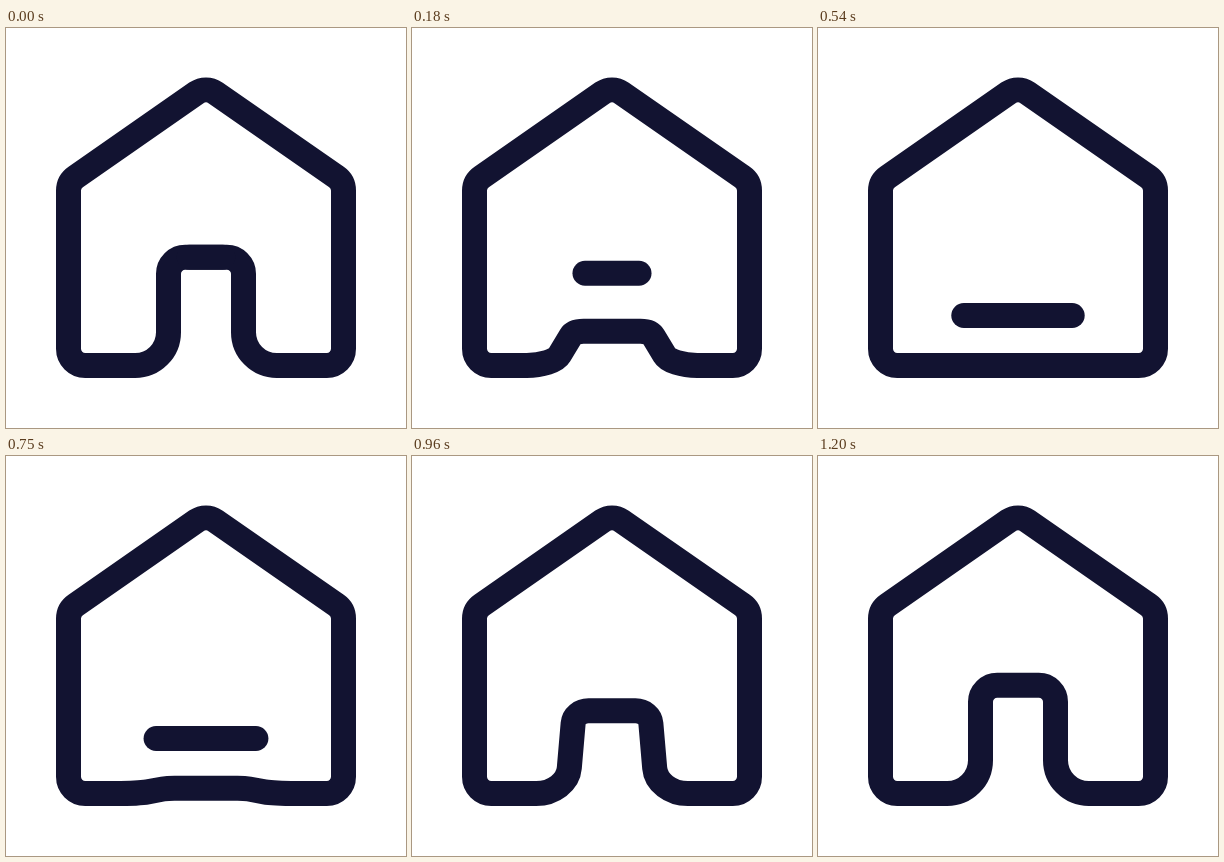
These frames come from a looping animation (400 px wide and 400 px high, 3230 ms). An HTML page:

```html
<!DOCTYPE html>
<html lang="en">
<head>
<meta charset="utf-8">
<title>Home</title>
<style>
  html, body { margin: 0; width: 100%; height: 100%; overflow: hidden; background: #fff; }
  svg { display: block; width: 100%; height: 100%; }
  path { fill: none; stroke: #121331; stroke-width: 25; stroke-linecap: round; stroke-linejoin: round; }
</style>
</head>
<body>
<svg viewBox="0 0 400 400">
  <path id="house"/>
  <path id="bar"/>
</svg>
<script>
const LOOP = 3230, STEP = 30, OPEN_AT = 660, DURATION = 540, CLOSE_DURATION = 360;
const FLOOR = 337.5, DOOR_TOP = 229.2;

const house = document.getElementById('house');
const bar = document.getElementById('bar');

const mix = (a, b, k) => a + (b - a) * k;
const clamp = v => Math.min(1, Math.max(0, v));

// Cubic easing with control points (x1, 0) and (x2, 1).
const ease = (x1, x2) => x => {
  x = clamp(x);
  let low = 0, high = 1;
  for (let i = 0; i < 30; i++) {
    const s = (low + high) / 2, r = 1 - s;
    if (3 * s * r * r * x1 + 3 * s * s * r * x2 + s ** 3 < x) low = s; else high = s;
  }
  return low * low * (3 - 2 * low);
};
const closeDoor = ease(0, 0.58);
const swing = ease(0.5, 0.3);
const raiseBar = ease(0.27, 0.79);

// Left half of the doorway: x open, y open, x closed. Closed points lie on the floor.
const doorway = [
  [129.2, FLOOR, 108],
  [147.6, FLOOR, 122],
  [162.5, 322.6, 135.5],
  [162.5, 304.2, 140.5],
  [162.5, 245.8, 156.7],
  [162.5, 236.6, 159.2],
  [170, DOOR_TOP, 162],
  [179.2, DOOR_TOP, 168]
];

const walls = 'H320.8 C330 337.5 337.5 330 337.5 320.8 V162.6 C337.5 157.1 334.8 152 330.3 148.9 ' +
  'L209.6 64.9 C203.8 60.9 196.2 60.9 190.4 64.9 L69.7 148.9 C65.2 152 62.5 157.1 62.5 162.6 ' +
  'V320.8 C62.5 330 70 337.5 79.2 337.5 Z';

function housePath(closed) {
  const left = doorway.map(([x, y, shutX]) => [mix(x, shutX, closed), mix(y, FLOOR, closed)]);
  const right = left.map(([x, y]) => [400 - x, y]).reverse();
  const side = p => `C${p.slice(1, 4).join(' ')} L${p[4]} C${p.slice(5).join(' ')}`;
  return `M${left[0]} ${side(left)} L${right[0]} ${side(right)} ${walls}`;
}

function draw(time) {
  const t = Math.floor((time % LOOP) / STEP) * STEP;
  const opening = t >= OPEN_AT;
  const u = (opening ? t - OPEN_AT : t) / DURATION;
  const closed = opening ? 1 - swing(u) : closeDoor(t / CLOSE_DURATION);
  const drop = opening ? 1 - raiseBar(u) : swing(u);

  const barY = mix(DOOR_TOP, 287.5, drop);
  const half = mix(opening ? 4 : 16.7, 54.2, drop);
  const doorY = mix(DOOR_TOP, FLOOR, closed);

  house.setAttribute('d', housePath(closed));
  bar.setAttribute('d', `M${200 - half} ${barY} H${200 + half}`);
  // The rising door top swallows the bar.
  bar.style.display = opening && doorY < barY + 1 ? 'none' : '';
}

const start = performance.now();
function tick() {
  draw(performance.now() - start);
  requestAnimationFrame(tick);
}
tick();
</script>
</body>
</html>
```
